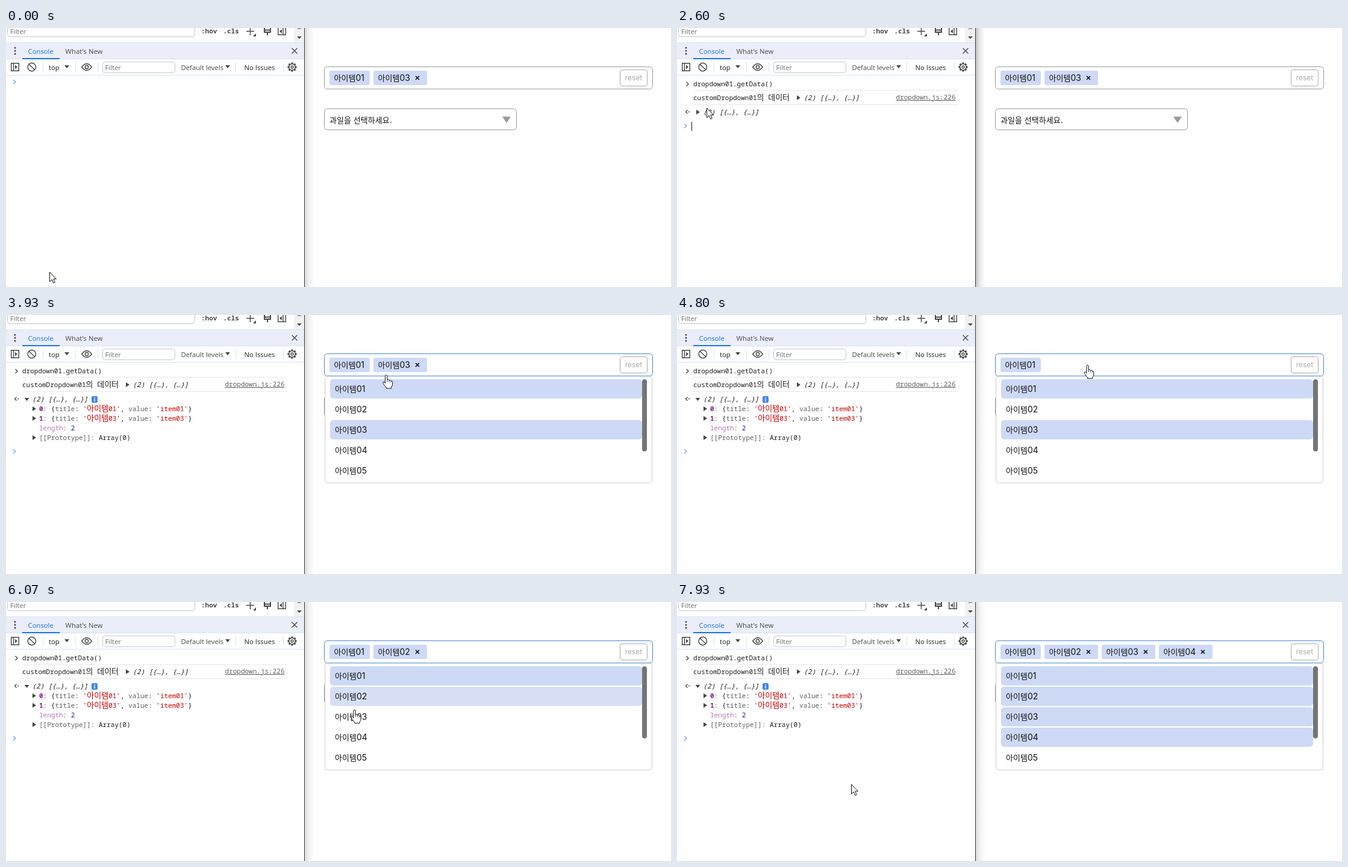
An HTML page that plays this animation: 1104x431 px, repeating every 8000 ms.

```html
<!DOCTYPE html>
<html lang="ko">
<head>
<meta charset="utf-8">
<title>Dropdown and console</title>
<style>
html, body { margin: 0; width: 100%; height: 100%; overflow: hidden; background: #fff; }
svg { display: block; width: 100vw; height: 100vh; }
text { white-space: pre; fill: #1f1f1f; }
.ui { font: 11.3px "Open Sans", "Noto Sans", sans-serif; }
.mono { font: 11px "Noto Sans Mono", "DejaVu Sans Mono", monospace; }
.page { font: 14px Inter, sans-serif; fill: #111; }
.k { font-family: "Noto Sans CJK KR", "Noto Sans CJK", sans-serif; font-size: 13px; font-style: normal; }
.i { font-style: italic; }
.b { font-weight: 700; }
.g { fill: #5e5e5e; }
.s { fill: #c80000; }
.p { fill: #8e1a85; }
.q { fill: #b977b4; }
.n { fill: #1a1aa6; }
.blue { fill: #1a73e8; }
.dim { fill: #6e6e6e; }
.ink { fill: #474747; }
.line { fill: none; stroke: #474747; stroke-width: 1.4; }
</style>
</head>
<body>
<svg id="stage" viewBox="0 0 1104 431" preserveAspectRatio="none"></svg>
<script>
const LOOP = 8000, FRAME = 200 / 3;
const WHITE = [255, 255, 255], HOVER = [245, 245, 245], PICKED = [205, 217, 245];
const GRAY = [153, 153, 153], FOCUS = [74, 134, 208];

const text = (x, y, cls, str, extra = '') =>
  `<text x="${x}" y="${y}" class="${cls}" ${extra}>${str.replace(/[가-힣]+/g, '<tspan class="k">$&</tspan>')}</text>`;
const rect = (x, y, w, h, fill, rx = 0, extra = '') =>
  `<rect x="${x}" y="${y}" width="${w}" height="${h}" rx="${rx}" fill="${fill}" ${extra}/>`;
const frame = (x, y, w, h, color, rx, id = '') =>
  rect(x + .5, y + .5, w - 1, h - 1, '#fff', rx, `stroke="${color}" ${id && `id="${id}"`}`);
const path = (d, extra = 'class="line"') => `<path d="${d}" ${extra}/>`;
const group = (id, body) => `<g id="${id}">${body}</g>`;
const span = (cls, str) => `<tspan class="${cls}">${str}</tspan>`;
const right = (x, y) => path(`M${x} ${y - 4}l6 4l-6 4z`, 'class="ink"');
const down = (x, y, w = 8, h = 5) => path(`M${x} ${y}h${w}l${-w / 2} ${h}z`, 'class="ink"');

function devtools() {
  const gear = Array.from({ length: 8 }, (_, i) =>
    `<rect x="473.5" y="57.4" width="3" height="3" class="ink" transform="rotate(${i * 45} 475 65)"/>`).join('');
  return rect(0, 0, 495, 431, '#fff') +
    // styles toolbar
    frame(2, -8, 312, 23, '#c4c7c5', 4) + text(7, 10, 'ui dim', 'Filter') +
    text(324, 9, 'mono ink b', ':hov') + text(360.5, 9, 'mono ink b', '.cls') +
    path('M399 5.5h13M405.5 -1v13') + path('M415 9v5h-5z', 'class="ink"') +
    path('M429 -2v9h10v-9M429 3.5h10M434 7v5', 'fill="none" stroke="#474747" stroke-width="2"') +
    path('M451.7 -2v13.3h12.6v-13.3M460 -2v13') + path('M458 2v7l-4-3.5z', 'class="ink"') +
    rect(478, 0, 17, 24, '#f1f1f1') + down(483, 14, 8, 4) + path('M483 2h8l-3-3h-2z', 'fill="#a3a3a3"') +
    // tabs
    rect(0, 24, 495, 27, '#ebeef8') + rect(0, 24, 495, 1, '#d3e3fd') + rect(0, 51, 495, 1, '#d3e3fd') +
    [33, 38, 43].map(y => `<circle cx="15" cy="${y}" r="1.5" class="ink"/>`).join('') +
    text(36.5, 43, 'ui blue', 'Console') + text(98.5, 43, 'ui ink', "What's New") +
    rect(27, 50, 62, 2, '#1a73e8') + path('M474.5 33.5l9 9M483.5 33.5l-9 9') +
    // console toolbar
    rect(0, 78, 495, 1, '#d3e3fd') +
    [61, 115, 152, 381, 460].map(x => rect(x, 57, 1, 16, '#d3e3fd')).join('') +
    path('M8.7 58.7h12.6v12.6h-12.6zM12.5 59v12') + path('M15 61.5v7l4-3.5z', 'class="ink"') +
    path('M38 60l10 10M49.5 65a6.7 6.7 0 1 1-13.4 0a6.7 6.7 0 1 1 13.4 0z') +
    text(71, 70, 'ui', 'top') + down(97, 62) +
    path('M125.7 65q8.3-11 16.6 0q-8.3 11-16.6 0z') +
    '<circle cx="134" cy="65" r="2.7" class="line"/>' +
    frame(160, 56, 121, 19, '#c4c7c5', 4) + text(164.5, 70, 'ui dim', 'Filter') +
    text(290.5, 70, 'ui ink', 'Default levels') + down(364, 62) +
    text(395.5, 70, 'ui', 'No Issues') +
    '<circle cx="475" cy="65" r="5.4" class="line"/><circle cx="475" cy="65" r="2" class="line"/>' + gear;
}

function consoleLog() {
  const preview = '(2) [{…}, {…}]';
  const entry = (i, no) => {
    const y = 160 + i * 16;
    return right(44, y - 4) + text(55, y, 'mono', span('p b', i) + span('g', ': ') + '{' + span('g', 'title') + ': ' +
      span('s', `'아이템${no}'`) + ', ' + span('g', 'value') + ': ' + span('s', `'item${no}'`) + '}');
  };
  return group('typed', text(25, 94, 'mono', 'dropdown01.getData()')) +
    group('brackets', path('M144.5 84.5h5.5v12h-5.5zM151 84.5h5.5v12h-5.5z', 'fill="none" stroke="#b8b8b8"')) +
    group('command', path('M15.5 90l3.5 3.5l-3.5 3.5') + text(27, 97, 'mono', 'dropdown01.getData()') +
      rect(27, 103, 439, 1, '#e6e6e6')) +
    group('result', text(27, 120, 'mono', 'customDropdown01의 데이터') + right(199, 116) +
      text(210.5, 120, 'mono i', preview) +
      text(363.5, 119, 'mono g', 'dropdown.js:226', 'text-decoration="underline"') +
      rect(27, 127, 439, 1, '#e6e6e6') +
      path('M17.5 136.5l-3 3l3 3', 'class="line" stroke-width="1.2"') + '<circle cx="20" cy="139.5" r="1" class="ink"/>' +
      text(43.5, 144, 'mono i', preview)) +
    group('closed', right(32, 140)) +
    group('opened', down(30.5, 138) + rect(142, 135, 10, 11, '#4285f4', 2) +
      path('M147 139.5v4.5M147 137v1.4', 'stroke="#fff" stroke-width="1.5"') +
      entry(0, '01') + entry(1, '03') +
      text(55, 192, 'mono', span('q', 'length') + span('g', ': ') + span('n', '2')) +
      right(44, 204) + text(55, 208, 'mono', span('g', '[[Prototype]]: ') + 'Array(0)')) +
    path('M12 -3.5l3.8 3.5l-3.8 3.5', 'id="prompt" fill="none" stroke="#1a73e8" stroke-width="1.5"') +
    rect(0, -7, 1, 15, '#111', 0, 'id="caret"');
}

const chip = (id, x, no, removable) => group(id,
  rect(x, 71, removable ? 89 : 67, 24, '#cdd9f5', 3) + text(x + 7.5, 88, 'page', '아이템' + no) +
  (removable ? path(`M${x + 70} 80l6 6m0-6l-6 6`, 'stroke="#111" stroke-width="1.7"') : ''));

function page() {
  const items = [0, 1, 2, 3, 4].map(i =>
    rect(538, 107 + i * 34, 518, 32, '#fff', 5, `id="row${i}"`) + text(546, 128 + i * 34, 'page', '아이템0' + (i + 1))).join('');
  return frame(528, 134, 320, 36, '#999', 5) + text(537, 157.5, 'page', '과일을 선택하세요.') +
    path('M824 147.5h14l-7 10.5z', 'fill="#999"') +
    group('menu', frame(529, 101, 544, 179, '#ccc', 5) + items + rect(1056, 107, 8, 120, '#757575', 4)) +
    frame(528, 64, 546, 38, '#999', 5, 'field') +
    frame(1019, 69, 46, 28, '#aaa', 3) +
    text(1042, 87, 'page', 'reset', 'text-anchor="middle" style="font-size:12px;fill:#aaa"') +
    chip('chipA', 537, '01', false) + chip('chipOld', 610, '03', true) +
    chip('chipB', 610, '02', true) + chip('chipC', 705, '03', true) + chip('chipD', 800, '04', true);
}

const shape = 'fill="#fff" stroke="#111" stroke-linejoin="round"';
document.getElementById('stage').innerHTML =
  `<defs><linearGradient id="fade"><stop stop-color="#000" stop-opacity=".24"/>
  <stop offset=".4" stop-color="#000" stop-opacity=".09"/><stop offset="1" stop-color="#000" stop-opacity="0"/></linearGradient></defs>` +
  rect(0, 0, 1104, 431, '#fff') + page() + rect(496, 0, 16, 431, 'url(#fade)', 0, 'id="shadow"') +
  devtools() + consoleLog() + rect(495, 0, 1, 431, '#3c3c3c') +
  group('arrow', path('M.5 .5V16.5L4.2 13L6.6 18.8L9.2 17.7L6.8 12H11.5Z', shape)) +
  group('hand', path('M-2 2q0-1.6 1.6-1.6T1.3 2v6.2q2.6-1 3.2.9q2.5-.7 3 1.1q2.6-.3 2.6 2.2v3.6q0 2.8-2 4.4v2.3h-8.4v-1.8q-2.7-2.4-5.2-6.6q-.8-2.6 1.4-2.7l2.1 2.4z', shape) +
    path('M1.4 8v4M4.5 9.4v3M7.5 10.4v2.4', 'stroke="#111" stroke-width=".8"'));

const $ = id => document.getElementById(id);
const show = (id, on) => $(id).setAttribute('display', on ? 'inline' : 'none');
const place = (id, x, y) => $(id).setAttribute('transform', `translate(${x} ${y})`);
const mix = (a, b, k) => a.map((v, i) => v + (b[i] - v) * k);
const ease = k => 1 - (1 - Math.min(1, Math.max(0, k))) ** 1.4;
const paint = (id, attr, c) => $(id).setAttribute(attr, `rgb(${c.map(Math.round)})`);

// [time, x, y] of the pointer tip
const route = [
  [0, 72, 406], [70, 72, 400], [530, 74, 90], [2070, 74, 90], [2670, 46, 138], [2870, 46, 138],
  [3400, 722, 111], [3730, 640, 92], [3930, 631, 99], [4200, 650, 114], [4600, 683, 83], [4800, 683, 83],
  [5070, 605, 80], [5330, 605, 80], [5530, 581, 171], [5870, 581, 166], [6270, 577, 192], [6670, 572, 240],
  [6730, 572, 258], [6800, 480, 330], [6930, 245, 425], [7000, 180, 460], [7470, 720, 460],
  [7530, 697, 415], [7670, 560, 275], [7730, 470, 253], [7930, 289, 303], [LOOP, 289, 303]
];

// start colour, then [time, colour] changes for each menu row
const rows = [
  [PICKED],
  [WHITE, [5400, HOVER], [5870, PICKED]],
  [PICKED, [4800, WHITE], [6070, HOVER], [6270, PICKED]],
  [WHITE, [6400, HOVER], [6670, PICKED]],
  [WHITE, [6730, HOVER], [6800, WHITE]]
];

function pointer(t) {
  const i = Math.max(1, route.findIndex(p => p[0] > t));
  const [a, b] = [route[i - 1], route[i]];
  return mix(a, b, (t - a[0]) / (b[0] - a[0])).slice(1);
}

function draw(time) {
  const t = Math.min(LOOP - 1, Math.floor((time % LOOP + 4) / FRAME) * FRAME + 4);
  const within = (from, to) => t >= from && t < to;

  const [x, y] = pointer(t);
  const hand = within(3660, 6790);
  place('arrow', x, y);
  place('hand', x, y);
  show('arrow', !hand);
  show('hand', hand);

  show('typed', within(1130, 1670));
  show('brackets', within(1600, 1670));
  show('command', t >= 1670);
  show('result', t >= 1730);
  show('closed', within(1730, 2730));
  show('opened', t >= 2730);
  const promptY = t < 1670 ? 89.5 : t < 1730 ? 116 : t < 2730 ? 163 : 227;
  place('prompt', 0, promptY);
  $('prompt').setAttribute('opacity', within(1130, 1670) ? 1 : .6);
  show('caret', within(530, 2730));
  place('caret', within(1130, 1670) ? 156 : 24, promptY);
  $('shadow').setAttribute('opacity', within(530, 3730) ? 1 : .6);

  show('menu', t >= 3730);
  paint('field', 'stroke', mix(GRAY, FOCUS, ease((t - 3730) / 200)));
  rows.forEach(([start, ...changes], i) => {
    const color = changes.reduce((c, [at, to]) => mix(c, to, ease((t - at) / 300)), start);
    paint('row' + i, 'fill', color);
  });
  show('chipOld', t < 4800);
  show('chipB', t >= 5870);
  show('chipC', t >= 6270);
  show('chipD', t >= 6670);
}

const begin = performance.now();
(function tick() {
  draw(performance.now() - begin);
  requestAnimationFrame(tick);
})();
</script>
</body>
</html>
```
